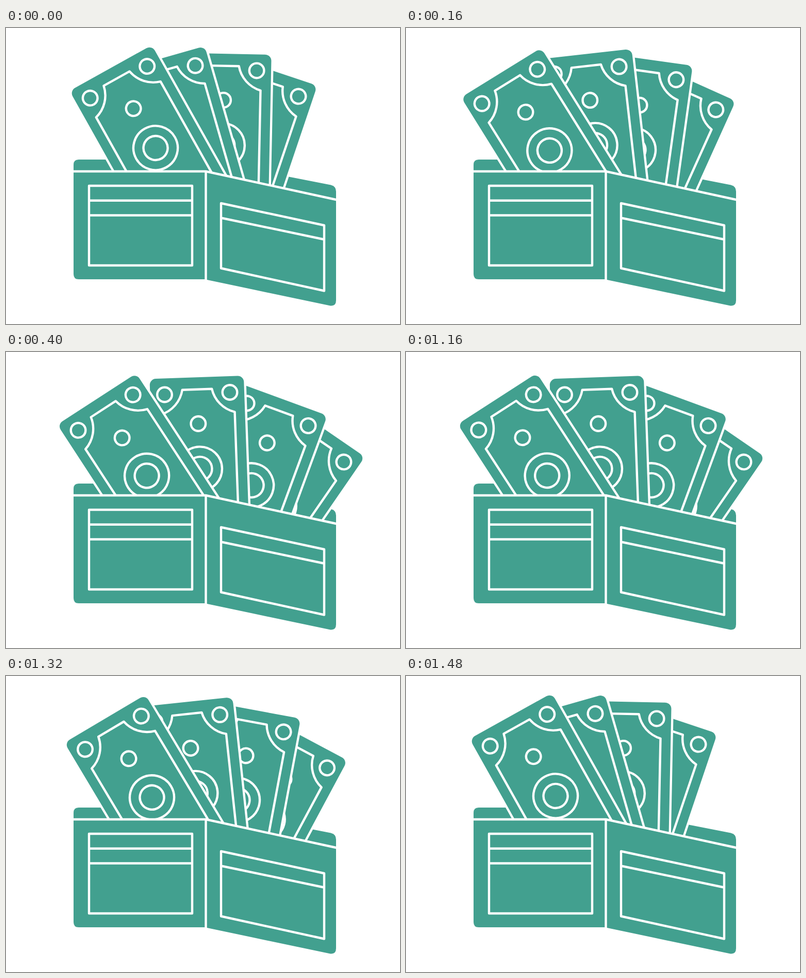
These frames come from a looping animation (764 by 576 pixels, 1.96 s). An HTML page:

```html
<!DOCTYPE html>
<html lang="en">
<head>
<meta charset="utf-8">
<title>Wallet</title>
<style>
  html, body { margin: 0; width: 100%; height: 100%; overflow: hidden; background: #fff; }
  svg { display: block; width: 100%; height: 100%; }
  .fill { fill: #42a08f; }
  .line { fill: none; stroke: #fff; stroke-width: 4.4; stroke-linejoin: round; }
  .paper { stroke: #fff; stroke-width: 8.6; paint-order: stroke; }

  /* Each bill is drawn fanned out and swings about its own pivot. */
  .bill {
    --smooth: cubic-bezier(.333, 0, .667, 1);
    --quick: cubic-bezier(.333, 0, .385, 1);
    animation: 1960ms var(--smooth) infinite;
    rotate: var(--closed);
  }
  .first  { --closed: 3.85deg;   transform-origin: 390px 489px; animation-name: swing-first; }
  .second { --closed: -13.94deg; transform-origin: 379px 350px; animation-name: swing-second; }
  .third  { --closed: -18.99deg; transform-origin: 355px 412px; animation-name: swing-third; }
  .fourth { --closed: -15.9deg;  transform-origin: 321px 488.5px; animation-name: swing-fourth; }

  @keyframes swing-first {
    0% { rotate: var(--closed); animation-timing-function: var(--quick); }
    20.408%, 57.143% { rotate: 0deg; }
    75.51%, 100% { rotate: var(--closed); }
  }
  @keyframes swing-second {
    0% { rotate: var(--closed); animation-timing-function: var(--quick); }
    20.408%, 62.908% { rotate: 0deg; }
    75.51%, 100% { rotate: var(--closed); }
  }
  @keyframes swing-third {
    0%, 75.51%, 100% { rotate: var(--closed); }
    20.408%, 59.184% { rotate: 0deg; }
  }
  @keyframes swing-fourth {
    0%, 75.51%, 100% { rotate: var(--closed); }
    20.408%, 61.224% { rotate: 0deg; }
  }
</style>
</head>
<body>
<svg viewBox="0 0 764 576">
  <defs>
    <!-- Origin: midway between the two upper corner rings -->
    <g id="bill">
      <rect class="fill paper" x="-91.3" y="-31.5" width="182.6" height="356" rx="12"/>
      <g class="line">
        <path d="M-71.5 254.5V38.5A60 60 0 0 0 -28.7 -8H28.7A60 60 0 0 0 71.5 38.5V254.5A60 60 0 0 0 28.7 301H-28.7A60 60 0 0 0 -71.5 254.5Z"/>
        <circle cx="-63.3" r="14.3"/>
        <circle cx="63.3" r="14.3"/>
        <circle cy="58.8" r="14.3"/>
        <circle cy="146.7" r="43"/>
        <circle cy="146.7" r="23.5"/>
      </g>
    </g>
  </defs>

  <!-- Back of the wallet -->
  <g class="fill">
    <path d="M131 285V266Q131 256 141 256H300V285Z"/>
    <path d="M480 276L630 305.5Q640 308 640 318V340L480 304Z"/>
  </g>

  <g class="bill fourth"><use href="#bill" transform="translate(602.8 178.2) rotate(34.5)"/></g>
  <g class="bill third"><use href="#bill" transform="translate(526.6 121.7) rotate(20.15)"/></g>
  <g class="bill second"><use href="#bill" transform="translate(370.75 80.75) rotate(-2.04)"/></g>
  <g class="bill first"><use href="#bill" transform="translate(193.1 117.8) rotate(-33.05)"/></g>

  <!-- Front of the wallet -->
  <g class="fill">
    <path d="M131 279H387.5V489H141Q131 489 131 479Z"/>
    <path d="M387.5 279L640 334V530Q640 542 628 540.3L387.5 489.5Z"/>
  </g>
  <g class="line">
    <path d="M129 279H387.5L642 334.5M387.5 279V491"/>
    <path d="M161 307H361V462H161ZM161 335.7H361M161 364.5H361"/>
    <path d="M417 341L617 384V511.5L417 467.5ZM417 369.5L617 411.5"/>
  </g>
</svg>
</body>
</html>
```
